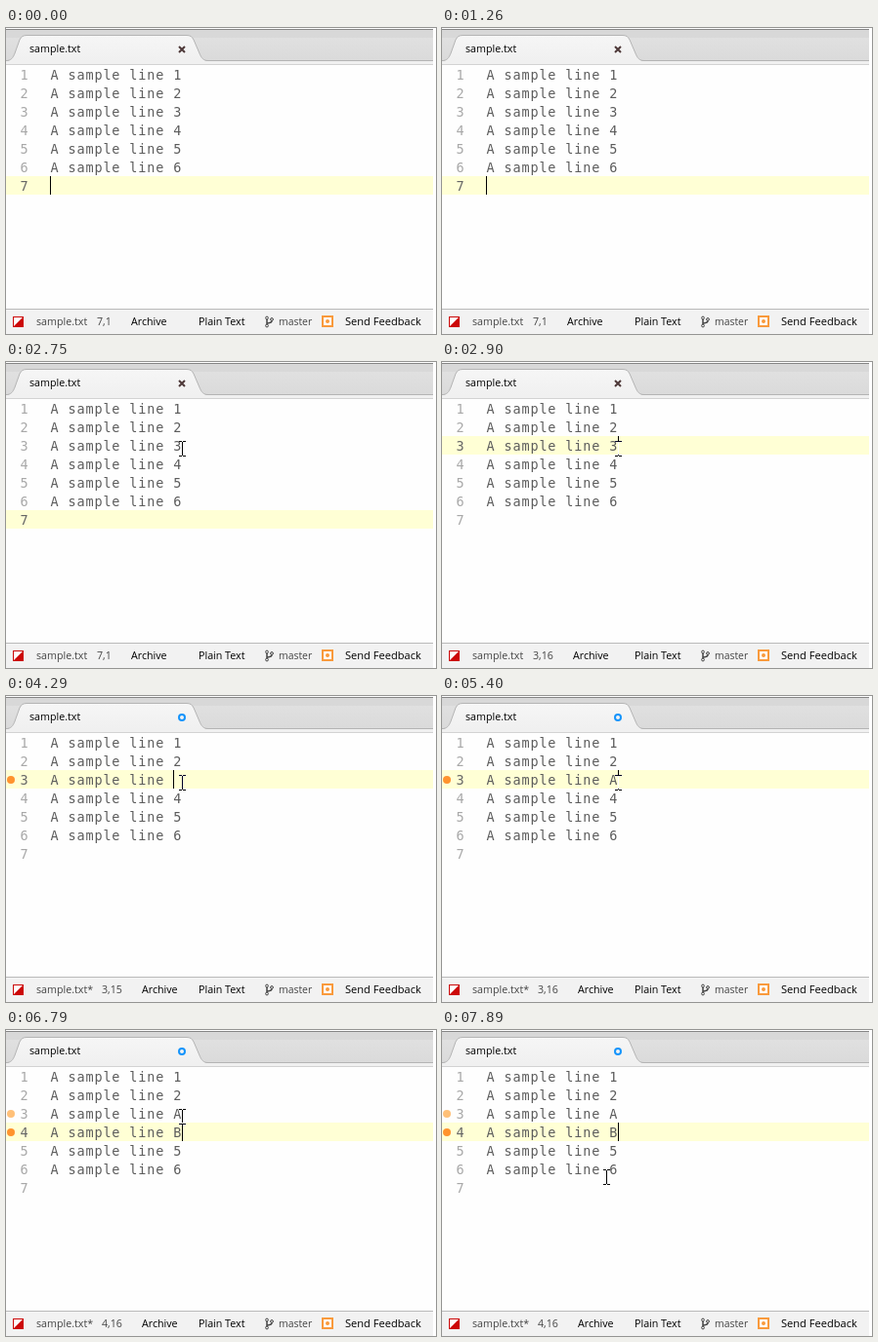
Animation of 440 by 314 pixels, one loop 8000 ms. Source, as an HTML page:

```html
<!DOCTYPE html>
<html lang="en">
<head>
<meta charset="utf-8">
<title>Editor</title>
<style>
  html, body { margin: 0; width: 100%; height: 100%; overflow: hidden; background: #fff; }
  svg { display: block; }
  text { white-space: pre; }
  rect { shape-rendering: crispEdges; }
  .code { font: 13.5px "DejaVu Sans Mono", "Noto Sans Mono", monospace; letter-spacing: .87px; fill: #5c5c5c; }
  .num { fill: #a8a8a8; }
  .num.on { fill: #666; }
  .ui { font: 10.7px "Open Sans", "Noto Sans", sans-serif; fill: #000; }
  .dim { fill: #444; }
  #beam { fill: #fff; mix-blend-mode: difference; }
</style>
</head>
<body>
<svg width="440" height="314" viewBox="0 0 440 314">
  <defs>
    <linearGradient id="bar" x2="0" y2="1">
      <stop offset="0" stop-color="#e0e0e0"/><stop offset="1" stop-color="#dadada"/>
    </linearGradient>
    <linearGradient id="tab" x2="0" y2="1">
      <stop offset="0" stop-color="#f6f6f6"/><stop offset="1" stop-color="#f0f0f0"/>
    </linearGradient>
  </defs>
  <rect width="440" height="314" fill="#fff"/>
  <rect width="437" height="314" fill="#fefefe"/>

  <rect y="1" width="437" height="37" fill="#d8d8d8"/>
  <rect y="1" width="437" height="1" fill="#858585"/>
  <rect y="10" width="437" height="24" fill="url(#bar)"/>
  <rect y="33" width="437" height="1" fill="#b4b4b4"/>
  <rect y="34" width="437" height="3" fill="#f0f0f0"/>
  <rect y="37" width="437" height="1" fill="#d2d2d2"/>
  <path d="M0 34C5 33.500 7 31 9 26L14 12Q16 7.500 21 7.500H185Q190 7.500 192 12L198 26C200 31 202 33.500 207 34Z" fill="url(#tab)"/>
  <path d="M0 33.500C5 33.500 7 31 9 26L14 12Q16 7.500 21 7.500H185Q190 7.500 192 12L198 26C200 31 202 33.500 207 33.500" fill="none" stroke="#b4b4b4"/>
  <text class="ui" x="24" y="25">sample.txt</text>
  <path id="close" d="M177 19L183 25M183 19L177 25" stroke="#4d3838" stroke-width="2"/>
  <circle id="ring" cx="180" cy="22" r="3" fill="none" stroke="#1494fb" stroke-width="2"/>

  <rect id="row" width="437" height="19" fill="#ffffd5"/>
  <g id="lines"></g>
  <rect id="caret" width="1" height="19" fill="#000"/>

  <rect y="289" width="437" height="25" fill="#f2f2f2"/>
  <rect y="288" width="437" height="1" fill="#b9b9b9"/>
  <rect x="7" y="296" width="11" height="11" fill="#cc0808"/>
  <path d="M8 297H17L8 306Z" fill="#fff"/>
  <text class="ui dim" id="file" x="31" y="305"></text>
  <text class="ui dim" id="pos" y="305"></text>
  <text class="ui" id="archive" y="305">Archive</text>
  <text class="ui" x="197" y="305">Plain Text</text>
  <g fill="none" stroke="#444">
    <circle cx="267" cy="297.500" r="1.400"/>
    <circle cx="272" cy="299" r="1.400"/>
    <circle cx="267" cy="305.500" r="1.400"/>
    <path d="M267 299V304M272 300.500Q272 302.500 267.500 303" stroke-width="1.500"/>
  </g>
  <text class="ui dim" x="279" y="305" style="font-size:10.4px">master</text>
  <rect x="324" y="296" width="10" height="10" fill="#fff" stroke="#f99a3c" stroke-width="2"/>
  <circle cx="329" cy="301" r="2" fill="#f99a3c"/>
  <text class="ui" x="347" y="305" style="font-size:11.1px">Send Feedback</text>

  <path id="beam" shape-rendering="crispEdges" d="M0 0h3v1h1v-1h3v1h-3v14h3v1h-3v-1h-1v1h-3v-1h3v-14h-3z"/>
</svg>
<script>
const LOOP = 8000, TOP = 38, ROW = 19, LEFT = 45, CHAR = 9;
const $ = id => document.getElementById(id);

const start = { row: 7, col: 1, caret: 1, beam: null, dirty: 0, l3: '3', l4: '4', dots: 0 };

// [time in ms, what changes]
const steps = [
  [150, { caret: 0 }],
  [580, { caret: 1 }],
  [990, { caret: 0 }],
  [1260, { caret: 1 }],
  [1660, { caret: 0, beam: [358, 101] }],
  [1810, { beam: [305, 98] }],
  [1930, { beam: [247, 96] }],
  [2080, { caret: 1, beam: [224, 95] }],
  [2200, { beam: [208, 95] }],
  [2350, { beam: [193, 88] }],
  [2470, { caret: 0, beam: [184, 83] }],
  [2620, { beam: [179, 82] }],
  [2750, { beam: [177, 81] }],
  [2900, { row: 3, col: 16, caret: 1 }],
  [3330, { caret: 0 }],
  [3740, { caret: 1 }],
  [4010, { l3: '', col: 15 }],
  [4290, { dirty: 1, dots: 1 }],
  [4410, { caret: 0 }],
  [4840, { caret: 1 }],
  [5240, { caret: 0 }],
  [5400, { l3: 'A', col: 16, caret: 1 }],
  [5710, { row: 4 }],
  [6140, { l4: '', col: 15 }],
  [6510, { dots: 2 }],
  [6630, { caret: 0 }],
  [6790, { l4: 'B', col: 16, caret: 1 }],
  [7340, { caret: 0 }],
  [7770, { caret: 1, beam: [172, 116] }],
  [7890, { beam: [165, 143] }]
];

function add(name, attrs) {
  const el = document.createElementNS('http://www.w3.org/2000/svg', name);
  for (const k in attrs) el.setAttribute(k, attrs[k]);
  return $('lines').appendChild(el);
}

const rowTop = n => TOP + ROW * (n - 1);
const nums = [], texts = [];
for (let n = 1; n <= 7; n++) {
  const y = rowTop(n) + 15;
  nums[n] = add('text', { class: 'code num', x: 14.4, y });
  nums[n].textContent = n;
  texts[n] = add('text', { class: 'code', x: LEFT + 0.4, y });
  if (n < 7) texts[n].textContent = 'A sample line ' + n;
}
const dots = [3, 4].map(n => add('circle', { cx: 5, cy: rowTop(n) + 10, r: 4 }));

const show = (el, on) => el.setAttribute('visibility', on ? 'visible' : 'hidden');

function draw(t) {
  const s = Object.assign({}, start, ...steps.filter(p => p[0] <= t).map(p => p[1]));
  $('row').setAttribute('y', rowTop(s.row));
  nums.forEach((el, n) => el.classList.toggle('on', n === s.row));
  texts[3].textContent = 'A sample line ' + s.l3;
  texts[4].textContent = 'A sample line ' + s.l4;
  dots.forEach((el, i) => {
    show(el, i < s.dots);
    el.setAttribute('fill', s.row === i + 3 ? '#ff932e' : '#ffc078');
  });

  $('caret').setAttribute('x', LEFT + CHAR * (s.col - 1));
  $('caret').setAttribute('y', rowTop(s.row));
  show($('caret'), s.caret);
  show($('beam'), s.beam);
  if (s.beam) $('beam').setAttribute('transform', `translate(${s.beam})`);

  show($('close'), !s.dirty);
  show($('ring'), s.dirty);
  $('file').textContent = 'sample.txt' + (s.dirty ? '*' : '');
  $('pos').textContent = s.row + ',' + s.col;
  $('pos').setAttribute('x', s.dirty ? 98 : 93);
  $('archive').setAttribute('x', s.dirty ? 139 : s.col > 9 ? 134 : 128);
}

const t0 = performance.now();
function tick() {
  draw((performance.now() - t0) % LOOP);
  requestAnimationFrame(tick);
}
tick();
</script>
</body>
</html>
```
